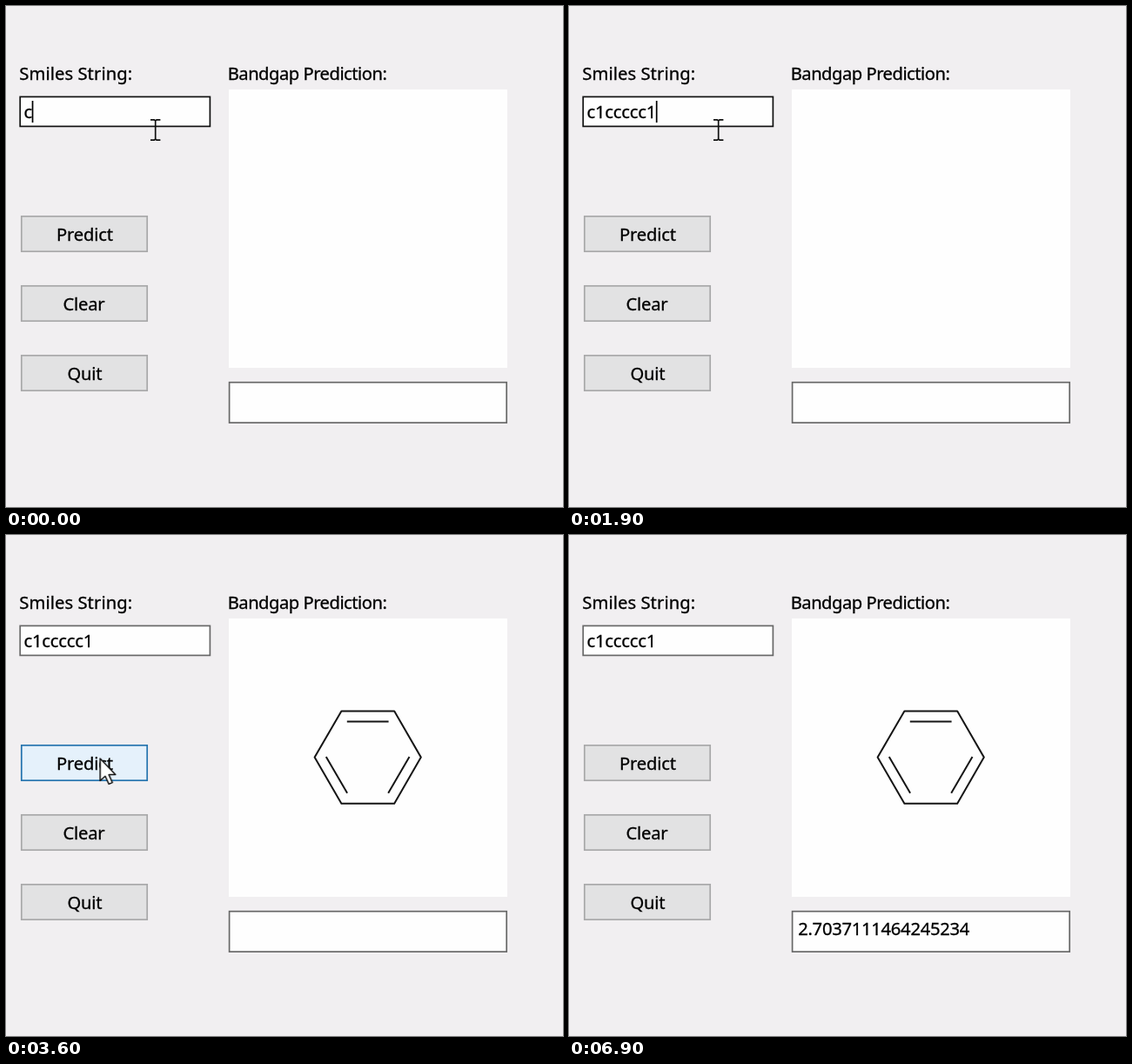
Recreate the animation shown at these times as an HTML page. Size 640 px wide and 576 px high, loop 7 s.

```html
<!DOCTYPE html>
<html lang="en">
<head>
<meta charset="utf-8">
<title>Bandgap Prediction</title>
<style>
  html, body { margin: 0; width: 100%; height: 100%; overflow: hidden; background: #f1eff1; }
  svg { display: block; width: 640px; height: 576px; }
  text {
    font: 20.2px "Noto Sans", "Open Sans", sans-serif;
    letter-spacing: -.2px;
    fill: #000;
    stroke: #000;
    stroke-width: .3;
  }
  .mid { text-anchor: middle; }
  .box { fill: #fefefe; stroke: #686868; stroke-width: 1.7; }
  .button { fill: #e2e2e3; stroke: #a8a8a9; stroke-width: 1.7; }
  .bonds { fill: none; stroke: #151515; stroke-width: 2; stroke-linejoin: round; }

  #entry, #predict, #molecule, #result, #beam, #arrow { animation: 7s linear infinite; }
  #entry { animation-name: entry; }
  #predict { animation-name: predict; }
  #arrow { animation-name: arrow; }
  #molecule { animation-name: molecule; animation-timing-function: step-end; }
  #result { animation-name: result; animation-timing-function: step-end; }
  #beam { animation-name: beam; animation-timing-function: step-end; }

  @keyframes entry {
    0%, 31.4% { stroke: #111; }
    34.28%, 44.28% { stroke: #1a7cc6; }
    47.14%, 100% { stroke: #686868; }
  }
  @keyframes predict {
    0%, 34.28% { fill: #e2e2e3; stroke: #a8a8a9; }
    38.57%, 44.28% { fill: #e5f1fb; stroke: #2473ae; }
    45%, 47.14% { fill: #cce4f7; stroke: #0a559a; }
    49.9%, 80% { fill: #e5f1fb; stroke: #2473ae; }
    84.28%, 100% { fill: #e2e2e3; stroke: #a8a8a9; }
  }
  @keyframes molecule { 0% { visibility: hidden; } 50%, 100% { visibility: visible; } }
  @keyframes result { 0% { visibility: hidden; } 77.13%, 100% { visibility: visible; } }
  @keyframes beam { 0% { visibility: visible; } 31.42%, 100% { visibility: hidden; } }
  @keyframes arrow {
    0%, 30% { transform: translate(172px, 142px); opacity: 0; }
    31.41% { transform: translate(167px, 168px); opacity: 0; }
    31.42% { transform: translate(167px, 168px); opacity: 1; }
    35.7% { transform: translate(149.5px, 260px); }
    41.42%, 77.5% { transform: translate(108.2px, 257px); }
    82.85% { transform: translate(15px, 262px); opacity: 1; }
    82.86%, 100% { transform: translate(-30px, 264px); opacity: 0; }
  }
</style>
</head>
<body>
<svg viewBox="0 0 640 576">
  <text x="15.3" y="84.5" style="letter-spacing: .07px">Smiles String:</text>
  <text x="254.7" y="84.5" style="letter-spacing: -.5px">Bandgap Prediction:</text>

  <rect id="entry" class="box" x="16.2" y="104.4" width="218.2" height="34"/>
  <text id="smiles" x="20.4" y="129">c</text>
  <rect id="caret" y="109" width="1.7" height="25"/>

  <rect id="predict" class="button" x="17.8" y="241.8" width="144.4" height="40.4"/>
  <rect class="button" x="17.8" y="321.8" width="144.4" height="40.4"/>
  <rect class="button" x="17.8" y="401.8" width="144.4" height="40.4"/>
  <text class="mid" x="90.4" y="270">Predict</text>
  <text class="mid" x="89.5" y="350">Clear</text>
  <text class="mid" x="90.4" y="430">Quit</text>

  <rect x="256" y="96" width="320" height="320" fill="#fefefe"/>
  <g id="molecule" class="bonds">
    <path d="M385.4 202.5H446.2L476.8 255.6 446.2 308.7H385.4L354.6 255.6Z"/>
    <path d="M391.8 214.5H439.6M367.8 255L392.1 296.8M463.5 255L439.2 296.8"/>
  </g>

  <rect class="box" x="256.6" y="432.7" width="318.6" height="46.4"/>
  <text id="result" x="263.2" y="460.4" style="letter-spacing: -.27px">2.7037111464245234</text>

  <path id="beam" d="M166 130.8H170.3L171.7 132 173.1 130.8H177.4M171.7 132V153M166 154.2H170.3L171.7 153 173.1 154.2H177.4"
        fill="none" stroke="#111" stroke-width="1.7"/>
  <path id="arrow" d="M0 0V25.5L5.8 20.2 10 29.4 14 27.6 10 18.6H17.6Z"
        fill="#fff" stroke="#111" stroke-width="1.5" stroke-linejoin="round"/>
</svg>
<script>
  const LOOP = 7000;
  const FORMULA = "c1ccccc1";
  const keyTimes = [0, 400, 800, 1000, 1200, 1400, 1600, 1900];
  const smiles = document.getElementById("smiles");
  const caret = document.getElementById("caret");
  let start;

  // The caret blinks 600 ms on, 300 ms off after each key, until focus leaves.
  function draw(now) {
    start ??= now;
    const t = (now - start) % LOOP;
    const typed = keyTimes.filter(k => k <= t);
    const sinceKey = t - typed[typed.length - 1];
    const text = FORMULA.slice(0, typed.length);
    if (smiles.textContent !== text) smiles.textContent = text;
    caret.setAttribute("x", 20.2 + smiles.getComputedTextLength());
    caret.style.visibility = t < 3100 && sinceKey % 900 < 600 ? "visible" : "hidden";
    requestAnimationFrame(draw);
  }
  requestAnimationFrame(draw);
</script>
</body>
</html>
```
